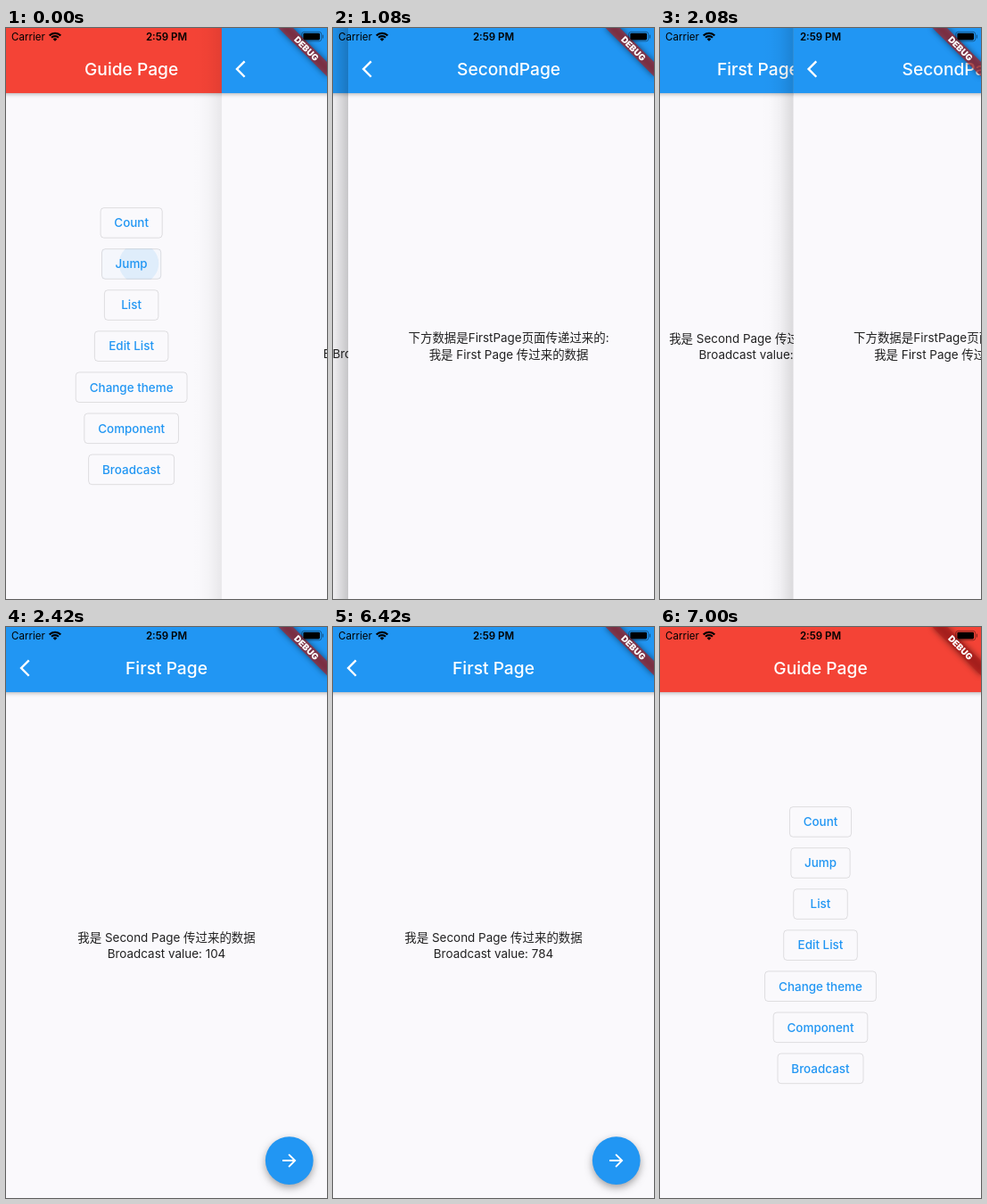
Recreate the animation shown at these times as an HTML page with a canvas. Size 360x640 px, loop 9.01 s.

```html
<!DOCTYPE html>
<html lang="zh-CN">
<head>
<meta charset="utf-8">
<title>Page navigation</title>
<style>
  html, body { margin: 0; width: 100%; height: 100%; overflow: hidden; }
  canvas { display: block; width: 360px; height: 640px; }
</style>
</head>
<body>
<canvas id="stage"></canvas>
<script>
const LOOP = 9010;
const W = 375, H = 667, BAR = 76;   // logical phone size
const BLUE = '#2196f3', RED = '#f44336', PAPER = '#faf9fc', INK = 'rgba(0,0,0,.87)';
const FAMILY = 'Inter, "Noto Sans CJK SC", "Noto Sans CJK", sans-serif';
const BUTTONS = [
  ['Count', 73], ['Jump', 70], ['List', 64], ['Edit List', 87],
  ['Change theme', 131], ['Component', 111], ['Broadcast', 101]
];
const BACK = new Path2D('M11.67 3.87L9.9 2.1 0 12l9.9 9.9 1.77-1.77L3.54 12z');
const FORWARD = new Path2D('M12 4l-1.41 1.41L16.17 11H4v2h12.17l-5.58 5.59L12 20l8-8z');

const canvas = document.getElementById('stage');
const ctx = canvas.getContext('2d');
const dpr = window.devicePixelRatio || 1;
canvas.width = 360 * dpr;
canvas.height = 640 * dpr;
const scale = canvas.width / W;

// cubic-bezier(.35, .91, .33, .97)
function ease(x) {
  if (x <= 0) return 0;
  if (x >= 1) return 1;
  const at = (s, a, b) => 3 * (1 - s) ** 2 * s * a + 3 * (1 - s) * s * s * b + s ** 3;
  let lo = 0, hi = 1;
  for (let i = 0; i < 30; i++) {
    const mid = (lo + hi) / 2;
    if (at(mid, .35, .33) < x) lo = mid; else hi = mid;
  }
  return at(lo, .91, .97);
}

// Slide progress, updated only at evenly spaced steps from first to last
function slide(t, first, last, steps, begin) {
  if (t < first) return 0;
  let now = first;
  for (let k = 1; k <= steps; k++) {
    const step = Math.round((first + (last - first) * k / steps) / 10) * 10;
    if (step <= t) now = step;
  }
  return ease((now - begin) / 500);
}

function text(str, x, y, size, weight, color, align = 'center') {
  ctx.font = `${weight} ${size}px ${FAMILY}`;
  ctx.textAlign = align;
  ctx.fillStyle = color;
  ctx.fillText(str, x, y);
}

function icon(path, x, y) {
  ctx.save();
  ctx.translate(x, y);
  ctx.fillStyle = '#fff';
  ctx.fill(path);
  ctx.restore();
}

function shadow(alpha, blur, dy) {
  ctx.shadowColor = `rgba(0,0,0,${alpha})`;
  ctx.shadowBlur = blur * dpr;
  ctx.shadowOffsetY = dy * dpr;
}

function disc(x, y, r, color) {
  ctx.fillStyle = color;
  ctx.beginPath();
  ctx.arc(x, y, r, 0, 2 * Math.PI);
  ctx.fill();
}

function page(x, title, color, body) {
  ctx.save();
  ctx.translate(x, 0);
  ctx.beginPath();
  ctx.rect(0, 0, W, H);
  ctx.clip();
  ctx.fillStyle = PAPER;
  ctx.fillRect(0, 0, W, H);
  body();
  ctx.save();
  shadow(.36, 5, 1.5);
  ctx.fillStyle = color;
  ctx.fillRect(-10, -10, W + 20, BAR + 10);
  ctx.restore();
  text(title, W / 2, 55.2, 20, 500, '#fff');
  if (color === BLUE) icon(BACK, 16, 36);
  ctx.restore();
}

function guide(x, pressed) {
  page(x, 'Guide Page', RED, () => BUTTONS.forEach(([label, w], i) => {
    const y = 227.5 + 48 * i;
    ctx.beginPath();
    ctx.roundRect((W - w) / 2 + .5, y - 17.5, w - 1, 35, 4);
    if (pressed && label === 'Jump') {
      const box = new Path2D();
      box.roundRect((W - w) / 2, y - 18, w, 36, 4);
      ctx.save();
      ctx.clip(box);
      ctx.fillStyle = 'rgba(33,150,243,.02)';
      ctx.fill(box);
      disc(196.2, 275, 23.2, 'rgba(33,150,243,.1)');
      ctx.restore();
      ctx.beginPath();
      ctx.roundRect((W - w) / 2 + .5, y - 17.5, w - 1, 35, 4);
    }
    ctx.lineWidth = 1;
    ctx.strokeStyle = 'rgba(0,0,0,.12)';
    ctx.stroke();
    text(label, W / 2, y + 5, 14, 500, BLUE);
  }));
}

function firstPage(x, returned, value) {
  page(x, 'First Page', BLUE, () => {
    if (returned) text('我是 Second Page 传过来的数据', W / 2, 367.8, 14, 400, INK);
    text('Broadcast value: ' + value, W / 2, returned ? 386.3 : 385, 14, 400, INK);
    ctx.save();
    shadow(.36, 8, 3.5);
    disc(331, 623, 28, BLUE);
    ctx.restore();
    icon(FORWARD, 319, 611);
  });
}

function secondPage(x) {
  page(x, 'SecondPage', BLUE, () => {
    text('下方数据是FirstPage页面传递过来的:', W / 2, 366.3, 14, 400, INK);
    text('我是 First Page 传过来的数据', W / 2, 386.3, 14, 400, INK);
  });
}

// Draws lower page with parallax, edge shadow, then upper page
function stack(p, lower, upper) {
  const x = W * (1 - p);
  if (p < 1) lower(-W * p / 3);
  if (p <= 0) return;
  if (p < 1) {
    const g = ctx.createLinearGradient(x - W / 10, 0, x, 0);
    [[0, 0], [.3, .016], [.6, .07], [1, .22]].forEach(([at, a]) =>
      g.addColorStop(at, `rgba(0,0,0,${a * p})`));
    ctx.fillStyle = g;
    ctx.fillRect(x - W / 10, 0, W / 10, H);
  }
  upper(x);
}

function banner() {
  ctx.save();
  ctx.translate(W, 0);
  ctx.rotate(Math.PI / 4);
  ctx.filter = `blur(${3.8 * dpr}px)`;
  ctx.fillStyle = 'rgba(0,0,0,.5)';
  ctx.fillRect(-40, 28, 80, 12);
  ctx.filter = 'none';
  ctx.fillStyle = 'rgba(183,28,28,.63)';
  ctx.fillRect(-40, 28, 80, 12);
  text('DEBUG', 0, 37.7, 10.2, 900, '#fff');
  ctx.restore();
}

function statusBar() {
  text('Carrier', 6.3, 14.7, 12, 400, '#000', 'left');
  text('2:59 PM', W / 2, 14.7, 12, 600, '#000');
  // wifi
  ctx.fillStyle = '#000';
  [[0, 3.4], [4.7, 7], [8.2, 10.5]].forEach(([inner, outer]) => {
    ctx.beginPath();
    ctx.arc(57.3, 15.4, outer, -Math.PI * .75, -Math.PI * .25);
    ctx.arc(57.3, 15.4, inner, -Math.PI * .25, -Math.PI * .75, true);
    ctx.fill();
  });
  // battery
  ctx.strokeStyle = 'rgba(0,0,0,.4)';
  ctx.lineWidth = 1;
  ctx.beginPath();
  ctx.roundRect(345.5, 4.5, 23, 11, 2.8);
  ctx.stroke();
  ctx.fillStyle = '#000';
  ctx.beginPath();
  ctx.roundRect(347.3, 6, 19.4, 8, 1.4);
  ctx.fill();
  ctx.fillStyle = 'rgba(0,0,0,.4)';
  ctx.fillRect(369.6, 8, 1.3, 4);
}

function draw(t) {
  const first = t < 80 ? .328 : 1 - slide(t, 6580, 7000, 5, 6500);
  const second = slide(t, 830, 1330, 6, 787) - slide(t, 1920, 2420, 6, 1920);
  const value = t < 4420 ? 104 : 784;
  ctx.setTransform(scale, 0, 0, scale, 0, 0);
  stack(first,
    x => guide(x, t < 80),
    x => stack(second, dx => firstPage(x + dx, t >= 1920, value), secondPage));
  banner();
  statusBar();
}

const start = performance.now();
function tick() {
  draw((performance.now() - start) % LOOP);
  requestAnimationFrame(tick);
}
tick();
</script>
</body>
</html>
```
